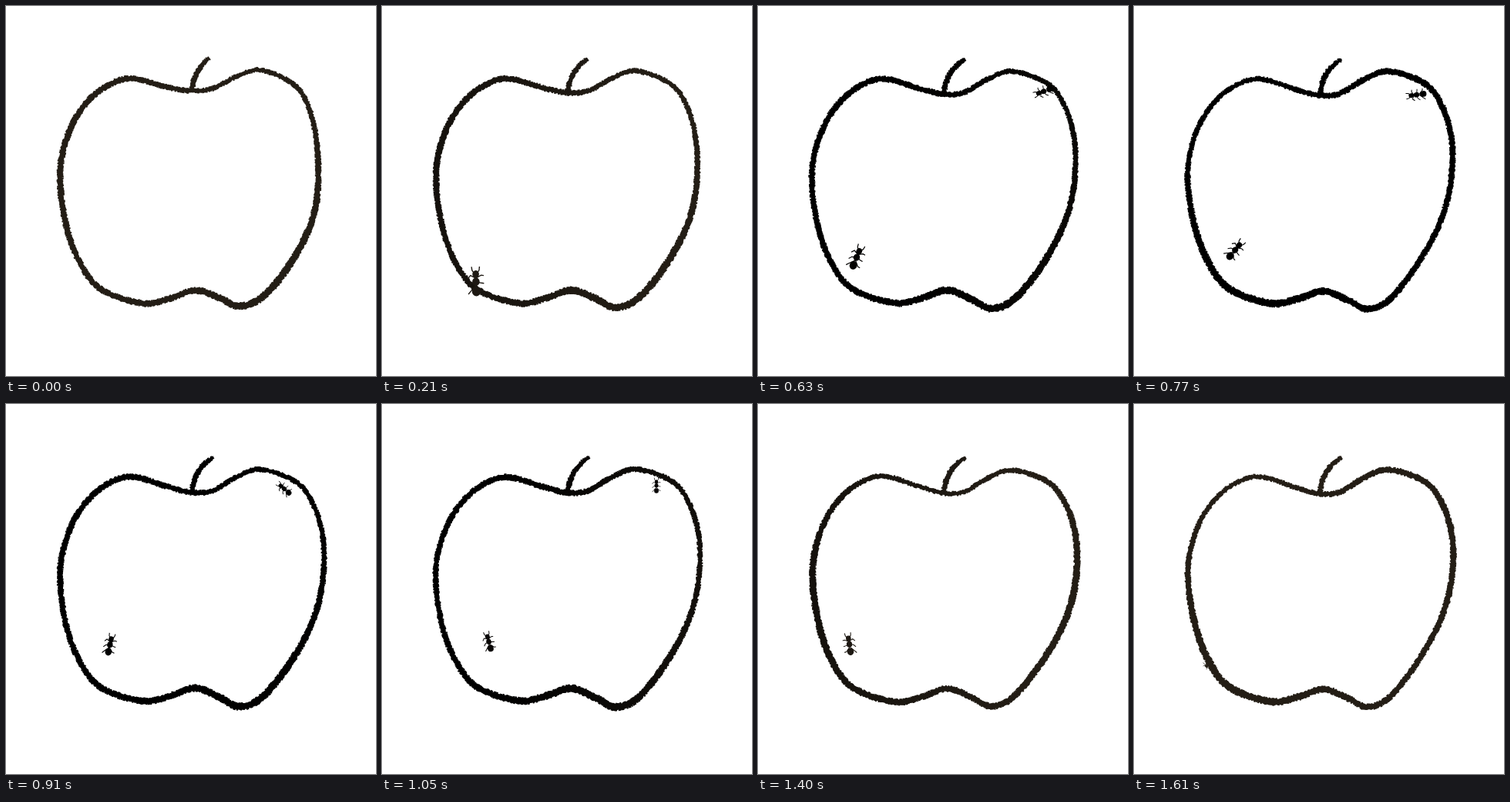
An HTML page with a canvas for the animation above (1680 ms loop, 480 by 480 pixels).

```html
<!DOCTYPE html>
<html lang="en">
<head>
<meta charset="utf-8">
<title>Apple and ants</title>
<style>
  html, body { margin: 0; width: 100%; height: 100%; overflow: hidden; background: #fff; }
  canvas { display: block; width: 100vw; height: 100vh; }
</style>
</head>
<body>
<canvas id="stage" width="480" height="480"></canvas>
<script>
const ctx = document.getElementById('stage').getContext('2d');
const STEP = 70, STEPS = 24, CENTER = 240, RAD = Math.PI / 180;

// Apple outline, clockwise from the stem.
const outline = [
  [241, 110], [268, 107], [300, 91], [330, 83], [376, 104], [394, 135],
  [403, 178], [405, 228], [399, 272], [381, 314], [350, 360], [323, 384],
  [299, 389], [278, 379], [246, 369], [214, 379], [180, 386], [124, 368],
  [98, 337], [79, 288], [70, 225], [76, 180], [95, 138], [124, 108],
  [160, 94], [212, 106]
];

// Where the apple swells or sinks over the loop: angle, spread, amount.
const lobes = [[-20, 25, 10], [-80, 22, -7], [68, 12, 4]];

// step, x, y, heading in degrees, scale
const ants = [
  [[1, 122, 370, -92, 1], [3, 122, 360, -92, 1.15], [6, 123, 343, -94, 1.1], [11, 130, 318, -50, .95],
   [15, 139, 310, -105, .8], [18, 134, 297, -15, 1], [23, 96, 338, -225, .7]],
  [[6, 378, 103, 140, .8], [11, 368, 115, 172, .8], [15, 356, 107, 270, .6], [18, 363, 86, 315, .65]]
];

const lerp = (a, b, u) => a + (b - a) * u;
const mix = (a, b, u) => a.map((v, i) => lerp(v, b[i], u));
const clamp = v => Math.min(1, Math.max(0, v));
const ink = tone => `rgb(${36 * tone},${30 * tone},${22 * tone})`;
const angleOf = (x, y) => Math.atan2(y - CENTER, x - CENTER);

function random(seed) {
  let s = seed * 7919 + 17;
  return () => {
    s = (s + 0x6D2B79F5) | 0;
    let t = Math.imul(s ^ (s >>> 15), 1 | s);
    t = (t + Math.imul(t ^ (t >>> 7), 61 | t)) ^ t;
    return ((t ^ (t >>> 14)) >>> 0) / 4294967296;
  };
}

// A ragged bristle mark across the line; (nx, ny) is the unit normal.
function bristle(x, y, nx, ny, width, color, rand) {
  const l = width / 2 + (rand() - .5) * 2, r = width / 2 + (rand() - .5) * 2;
  ctx.strokeStyle = color;
  ctx.lineWidth = 2.2;
  ctx.beginPath();
  ctx.moveTo(x - nx * l, y - ny * l);
  ctx.lineTo(x + nx * r, y + ny * r);
  ctx.stroke();
}

// Brush along a smooth closed curve through the points.
function drawOutline(pts, widthAt, toneAt, rand) {
  const n = pts.length, at = i => pts[(i + n) % n];
  const dist = (a, b) => Math.hypot(b[0] - a[0], b[1] - a[1]);
  const slope = i => {
    const a = at(i - 1), p = at(i), b = at(i + 1), d = dist(a, p) + dist(p, b);
    return [(b[0] - a[0]) / d, (b[1] - a[1]) / d];
  };
  for (let i = 0; i < n; i++) {
    const a = at(i), b = at(i + 1), s = slope(i), e = slope(i + 1);
    const len = dist(a, b), count = Math.ceil(len / 1.2);
    for (let k = 0; k < count; k++) {
      const u = k / count, u2 = u * u, u3 = u2 * u;
      const [x, y] = [0, 1].map(c =>
        (2 * u3 - 3 * u2 + 1) * a[c] + (3 * u2 - 2 * u3) * b[c] +
        len * ((u3 - 2 * u2 + u) * s[c] + (u3 - u2) * e[c]));
      const [tx, ty] = mix(s, e, u), t = Math.hypot(tx, ty), angle = angleOf(x, y);
      bristle(x, y, -ty / t, tx / t, widthAt(angle), ink(toneAt(angle)), rand);
    }
  }
}

function drawStem([x0, y0], settle, tone, rand) {
  const cx = 244, cy = 83, x1 = 264 + 6 * settle, y1 = 67 + 2 * settle;
  for (let u = 0; u <= 1; u += .025) {
    const v = 1 - u;
    const dx = v * (cx - x0) + u * (x1 - cx), dy = v * (cy - y0) + u * (y1 - cy), d = Math.hypot(dx, dy);
    bristle(v * v * x0 + 2 * u * v * cx + u * u * x1, v * v * y0 + 2 * u * v * cy + u * u * y1,
            -dy / d, dx / d, 6.5 - 2.5 * u ** 6, ink(tone), rand);
  }
}

function drawAnt(keys, step, tone) {
  const first = keys[0][0], last = keys[keys.length - 1][0];
  if (step < first || step > last) return;
  const i = Math.max(1, keys.findIndex(k => k[0] >= step));
  const a = keys[i - 1], b = keys[i];
  const [, x, y, heading, scale] = mix(a, b, (step - a[0]) / (b[0] - a[0]));
  // Foreshortened while climbing over the edge of the apple.
  const stretch = lerp(.45, 1, clamp(Math.min(step - first, last - step) / 2));
  const swing = step % 2 ? 1.5 : -1.5;
  ctx.save();
  ctx.translate(x, y);
  ctx.rotate(heading * RAD);
  ctx.scale(scale * stretch, scale);
  ctx.fillStyle = ctx.strokeStyle = ink(tone);
  ctx.lineWidth = 1.2;
  ctx.beginPath();
  for (const side of [-1, 1]) {
    for (const hip of [-2, 2, 6]) {
      const foot = hip * 2.2 - 4;
      ctx.moveTo(hip, 0);
      ctx.lineTo(foot, side * 6);
      ctx.lineTo(foot - 2 + side * swing, side * 9);
    }
    ctx.moveTo(12, side * 2);
    ctx.lineTo(15, side * 4);
    ctx.lineTo(19, side * 4.5);
  }
  ctx.stroke();
  ctx.beginPath();
  for (const [cx, r] of [[-9, 5.4], [2, 4.6], [10.5, 4.2]]) {
    ctx.moveTo(cx + r, 0);
    ctx.ellipse(cx, 0, r, r * .9, 0, 0, 7);
  }
  ctx.fill();
  ctx.restore();
}

function draw(step) {
  const rand = random(step + 1);
  const settle = 1 - Math.exp(-step / 4);
  const phase = rand() * 2 * Math.PI;

  // Brown at both ends of the loop, black in the middle, browner on the right between.
  const brown = Math.cos(Math.PI * step / (STEPS - 1)) ** 2;
  const toneAt = a => clamp(brown + 2 * brown * (1 - brown) * Math.cos(a));
  const widthAt = a => 7.2 + Math.sin(a) + .8 * Math.sin(2 * a + phase);

  const pts = outline.map(([x, y]) => {
    const a = angleOf(x, y);
    const swell = lobes.reduce((sum, [mid, spread, amount]) =>
      sum + amount * Math.exp(-(((a / RAD - mid) / spread) ** 2)), 0);
    const push = settle * (swell + .8 * Math.sin(3 * a + phase));
    const k = 1 + push / Math.hypot(x - CENTER, y - CENTER);
    return [lerp(CENTER, x, k), lerp(CENTER, y, k)];
  });

  ctx.fillStyle = '#fff';
  ctx.fillRect(0, 0, 480, 480);
  drawOutline(pts, widthAt, toneAt, rand);
  drawStem(pts[0], settle, brown, rand);
  ants.forEach(keys => drawAnt(keys, step, brown));
}

let shown = -1;
const start = performance.now();
function tick(now) {
  const step = Math.floor(Math.max(0, now - start) / STEP) % STEPS;
  if (step !== shown) draw(shown = step);
  requestAnimationFrame(tick);
}
tick(start);
</script>
</body>
</html>
```
